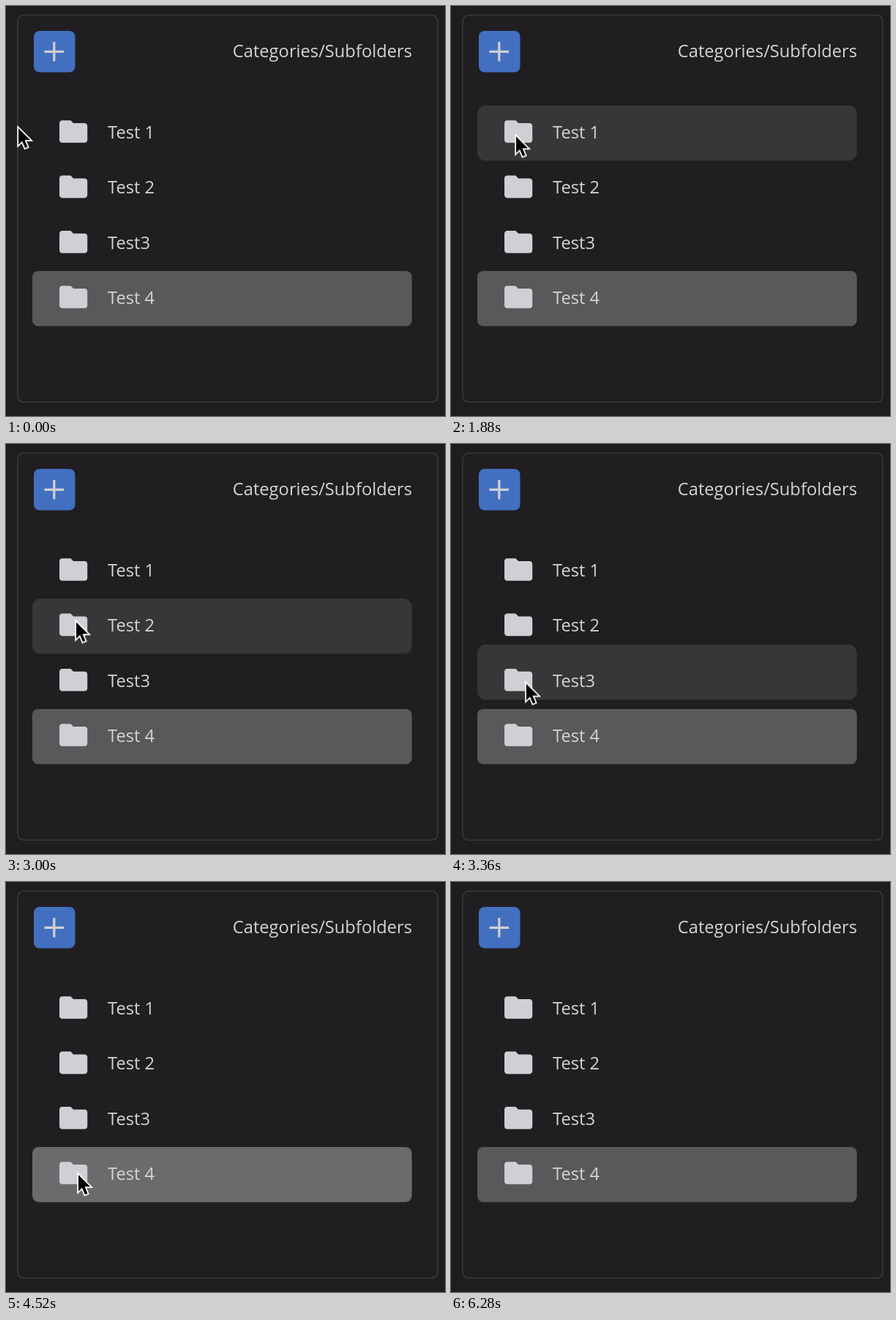
These frames come from a looping animation (600x560 px, 8.88 s). An HTML page:

```html
<!DOCTYPE html>
<html lang="en">
<head>
<meta charset="utf-8">
<title>Folder list</title>
<style>
  html, body { margin: 0; width: 100%; height: 100%; overflow: hidden; background: #1f1d1e; }
  svg { display: block; width: 600px; height: 560px; }
  text { font: 23.7px "Open Sans", "Noto Sans", sans-serif; fill: #d5d3d6; }
  .folder { fill: #d1cfd3; }
  .cursor { fill: #000; stroke: #fff; stroke-width: 3.5; paint-order: stroke; }
</style>
</head>
<body>
<svg viewBox="0 0 600 560">
  <defs>
    <path id="folder" d="M10 4H4c-1.1 0-2 .9-2 2v12c0 1.1.9 2 2 2h16c1.1 0 2-.9 2-2V8c0-1.1-.9-2-2-2h-8z"/>
  </defs>
  <rect width="600" height="1" fill="#171517"/>
  <rect x="16" y="12.5" width="574" height="528.5" rx="8" fill="#201e21" stroke="#3b393c" stroke-width="1.6"/>
  <rect x="38" y="34" width="56.5" height="56.5" rx="8" fill="#426fc0"/>
  <path d="M52.5 62.3H79M65.8 49V75.5" stroke="#d1cfd3" stroke-width="3.2"/>
  <text x="555" y="70" text-anchor="end">Categories/Subfolders</text>
  <rect x="36" y="362" width="518.7" height="75.3" rx="8" fill="#5a585b"/>
  <rect id="hover" x="36" width="518.7" height="75.3" rx="11" fill="#fff" fill-opacity=".11"/>
  <g id="rows"></g>
  <path id="cursor" class="cursor" d="M2 4V26.5L7 21.5 11 31 14.5 29.5 10.5 20H18Z"/>
</svg>
<script>
  const LOOP = 8880, TOP = 136, PITCH = 75.35;
  const $ = id => document.getElementById(id);

  $('rows').innerHTML = ['Test 1', 'Test 2', 'Test3', 'Test 4'].map((label, i) => `
    <g transform="translate(0 ${TOP + i * PITCH})">
      <use href="#folder" class="folder" transform="translate(69.2 12.6) scale(1.91)"/>
      <text x="139" y="45">${label}</text>
    </g>`).join('');

  // Each key is [time in ms, style values, easing to the next key].
  function play(el, keys) {
    const frames = keys.map(([ms, style, easing = 'linear']) =>
      ({ offset: ms / LOOP, easing, ...style }));
    frames.push({ ...frames[frames.length - 1], offset: 1 });
    el.animate(frames, { duration: LOOP, iterations: Infinity });
  }

  const at = (x, y) => ({ transform: `translate(${x}px, ${y}px)` });
  const row = i => at(0, TOP + i * PITCH);

  play($('cursor'), [
    [0, at(15, 163)], [330, at(35, 159)], [640, at(42, 158)], [920, at(71, 165)],
    [1200, at(86, 169)], [1840, at(86, 169)],
    [1880, at(87, 174), 'ease-out'], [2280, at(93, 236)], [2960, at(93, 236)],
    [3000, at(94, 239), 'ease-out'], [3400, at(101, 325)], [4080, at(101, 325)],
    [4160, at(103, 360)], [4320, at(104, 380), 'ease-out'], [4520, at(97, 396)], [5600, at(97, 396)],
    [5640, at(96, 396)], [5740, at(103, 397)], [5860, at(84, 397)],
    [5980, at(36, 397)], [6140, at(0, 397)], [6280, at(-26, 397)]
  ]);

  play($('hover'), [
    [0, row(0)],
    [2030, row(0), 'ease-in-out'], [2380, row(1)],
    [3110, row(1), 'ease-in-out'], [3460, row(2)],
    [4150, row(2), 'ease-in-out'], [4500, row(3)]
  ]);

  play($('hover'), [
    [0, { opacity: 0 }], [330, { opacity: 0 }], [620, { opacity: 1 }],
    [5980, { opacity: 1 }], [6280, { opacity: 0 }]
  ]);
</script>
</body>
</html>
```
